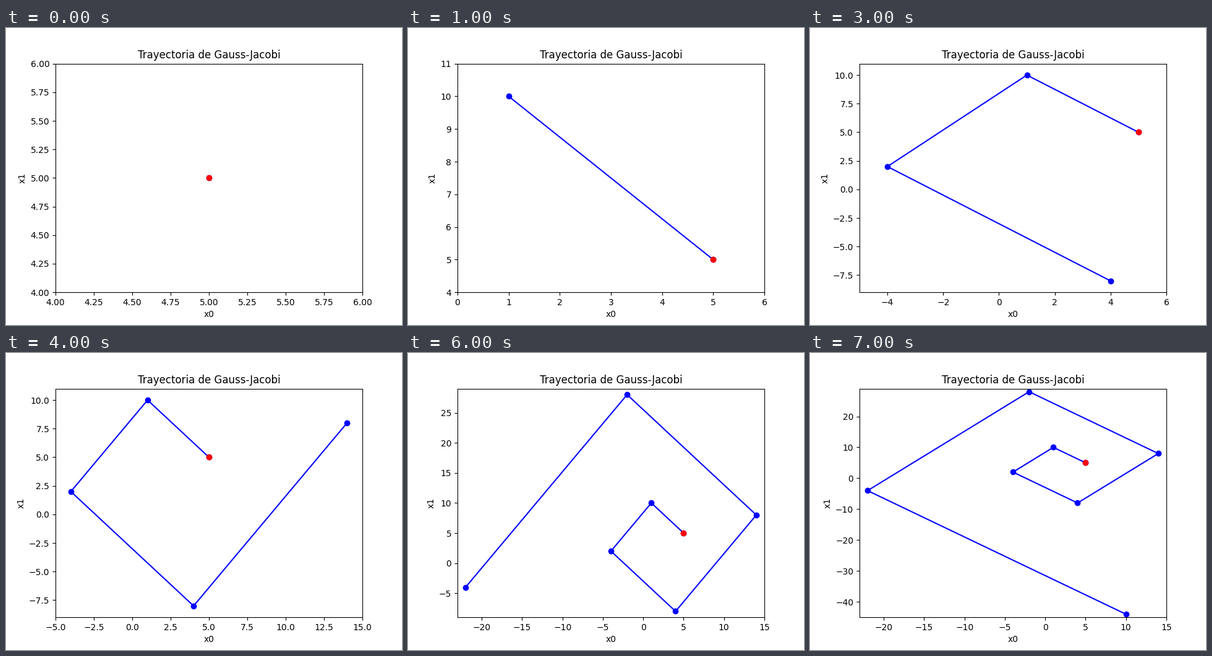
A matplotlib script that plays this animation: 640 by 480 pixels, repeating every 8000 ms.

```python
import numpy as np
import matplotlib.pyplot as plt
from matplotlib.animation import FuncAnimation

STEPS = 8
STEP_MS = 1000


def jacobi_path(x0, x1, count):
    """Iterate x0 = 6 - x1, x1 = 2 * x0, updating both at once."""
    path = [(x0, x1)]
    for _ in range(count - 1):
        x0, x1 = 6 - x1, 2 * x0
        path.append((x0, x1))
    return np.array(path)


path = jacobi_path(5, 5, STEPS)
fig, ax = plt.subplots(figsize=(6.4, 4.8), dpi=100)


def draw(step):
    ax.clear()
    shown = path[:step + 1]
    ax.plot(shown[:, 0], shown[:, 1], "bo-")
    ax.plot(*path[0], "ro")

    # Fit the view to the visited points with a margin of one unit
    low, high = shown.min(axis=0) - 1, shown.max(axis=0) + 1
    ax.set_xlim(low[0], high[0])
    ax.set_ylim(low[1], high[1])
    ax.set_xlabel("x0")
    ax.set_ylabel("x1")
    ax.set_title("Trayectoria de Gauss-Jacobi")


anim = FuncAnimation(fig, draw, frames=STEPS, init_func=lambda: draw(0),
                     interval=STEP_MS, repeat=True, repeat_delay=0)
plt.show()
```
